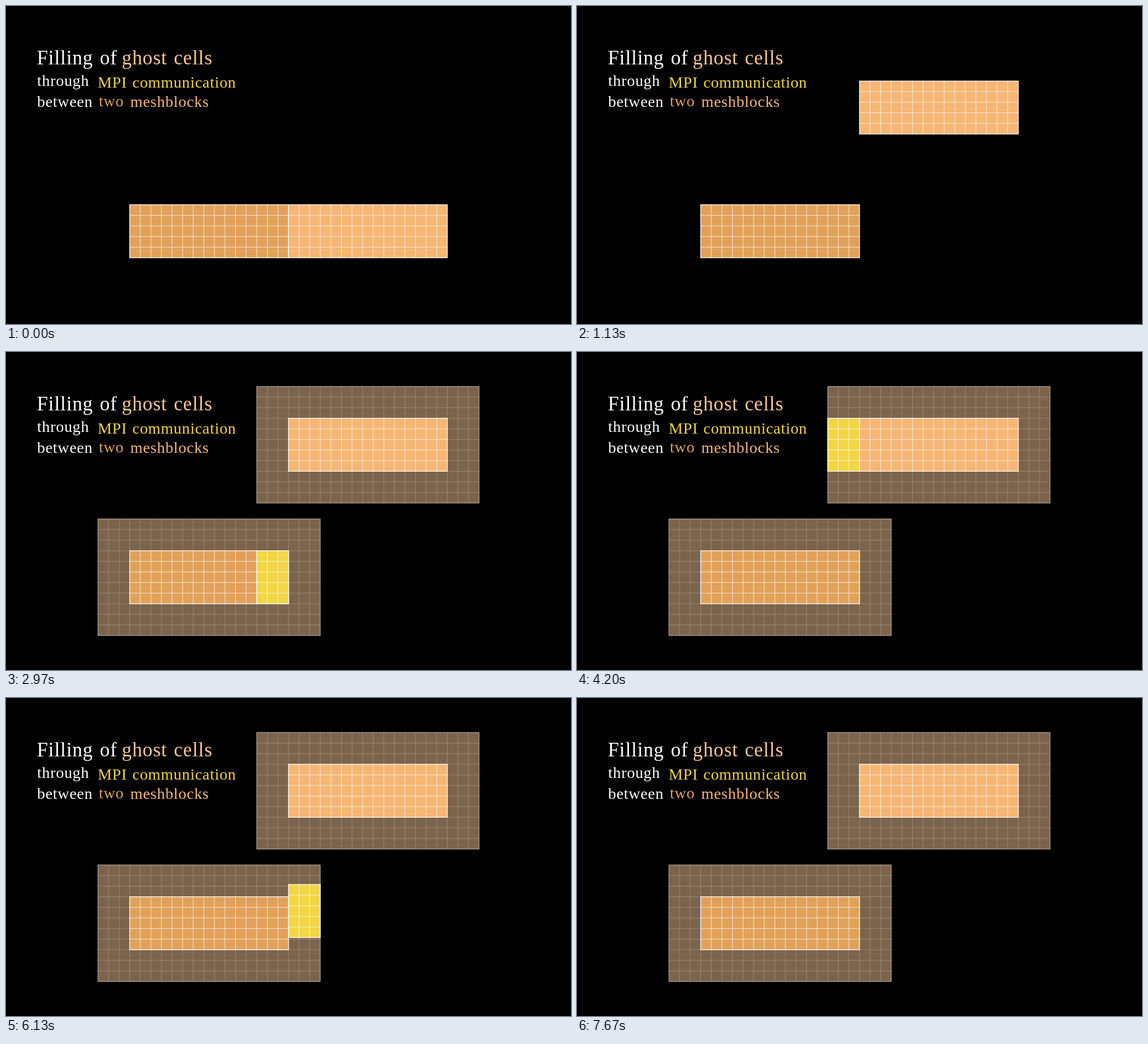
An HTML page for the animation above (8.46 s loop, 998 by 561 pixels).

```html
<!DOCTYPE html>
<html lang="en">
<head>
<meta charset="utf-8">
<title>Filling of ghost cells</title>
<style>
  html, body { margin: 0; width: 100%; height: 100%; overflow: hidden; background: #000; }
  svg { display: block; width: 100vw; height: 100vh; }
  text { font: 28px "Liberation Serif", serif; letter-spacing: .025em; word-spacing: .06em; }
  .title { font-size: 35px; }
</style>
</head>
<body>
<svg id="stage" viewBox="0 0 998 561"></svg>
<script>
const LOOP = 8460, FPS = 30;
const CELL = 18.7, MID_X = 499, LOW_Y = 350.6, HIGH_Y = 116.9;
const GOLD_A = '#f7c797', GOLD_B = '#f6b674', GOLD_D = '#e1a158', YELLOW = '#f2d644';
const stage = document.getElementById('stage');

function add(parent, tag, attrs, text = '') {
  const el = document.createElementNS('http://www.w3.org/2000/svg', tag);
  for (const key in attrs) el.setAttribute(key, attrs[key]);
  el.textContent = text;
  return parent.appendChild(el);
}

// A filled block of cells with its top left corner at the group origin.
function grid(cols, rows, fill, fillAlpha = 1, lineAlpha = .75, borderAlpha = 1) {
  const g = add(stage, 'g', {}), w = cols * CELL, h = rows * CELL;
  let lines = '';
  for (let i = 1; i < cols; i++) lines += `M${i * CELL} 0v${h}`;
  for (let j = 1; j < rows; j++) lines += `M0 ${j * CELL}h${w}`;
  add(g, 'rect', { width: w, height: h, fill, 'fill-opacity': fillAlpha });
  add(g, 'path', { d: lines, stroke: '#fff', 'stroke-opacity': lineAlpha });
  add(g, 'rect', { width: w, height: h, fill: 'none', stroke: '#fff', 'stroke-width': 1.3, 'stroke-opacity': borderAlpha });
  return g;
}
const ghostGrid = () => grid(21, 11, GOLD_A, .5, .22, .5);

function place(el, x, y, opacity = 1) {
  el.setAttribute('transform', `translate(${x} ${y})`);
  el.setAttribute('opacity', opacity);
}

// Normalised logistic easing from 0 to 1.
function smooth(x) {
  const sigmoid = v => 1 / (1 + Math.exp(-v)), edge = sigmoid(-5);
  x = Math.min(1, Math.max(0, x));
  return (sigmoid(10 * (x - .5)) - edge) / (1 - 2 * edge);
}
const ease = (t, start, duration) => smooth((t - start) / duration);
const mix = (a, b, k) => a + (b - a) * k;

[
  ['Filling of', 54.5, 103, '#fff', 'title'],
  ['ghost cells', 204.5, 103, GOLD_A, 'title'],
  ['through', 55, 141, '#fff'],
  ['MPI communication', 162, 143.5, YELLOW],
  ['between', 55, 178, '#fff'],
  ['two', 164, 177, GOLD_D],
  ['meshblocks', 219.5, 178, GOLD_B]
].forEach(([text, x, y, fill, name = '']) => add(stage, 'text', { x, y, fill, class: name }, text));

const lowGhost = ghostGrid(), highGhost = ghostGrid();
const lowBlock = grid(15, 5, GOLD_D), highBlock = grid(15, 5, GOLD_B);
const sent = grid(3, 5, YELLOW), returned = grid(3, 5, YELLOW);

const FADE = .25, TRANSFER = .6;
const visibility = (t, start, end) => ease(t, start, FADE) - ease(t, end, FADE);

function draw(t) {
  const ghost = ease(t, 1.5, FADE), pad = 3 * CELL, left = MID_X - 15 * CELL;
  place(lowGhost, left - pad, LOW_Y - pad, ghost);
  place(highGhost, MID_X - pad, HIGH_Y - pad, ghost);
  place(lowBlock, left, LOW_Y);
  place(highBlock, MID_X, mix(LOW_Y, HIGH_Y, ease(t, 0, 1.5)));
  place(sent, MID_X - pad, mix(LOW_Y, HIGH_Y, ease(t, 3.533, TRANSFER)), visibility(t, 2.72, 4.64));
  place(returned, MID_X, mix(HIGH_Y, LOW_Y, ease(t, 5.7, TRANSFER)), visibility(t, 4.89, 6.8));
}

function tick() {
  const ms = performance.now() % LOOP;
  draw(Math.floor((ms + 5) * FPS / 1000) / FPS);
  requestAnimationFrame(tick);
}
tick();
</script>
</body>
</html>
```
